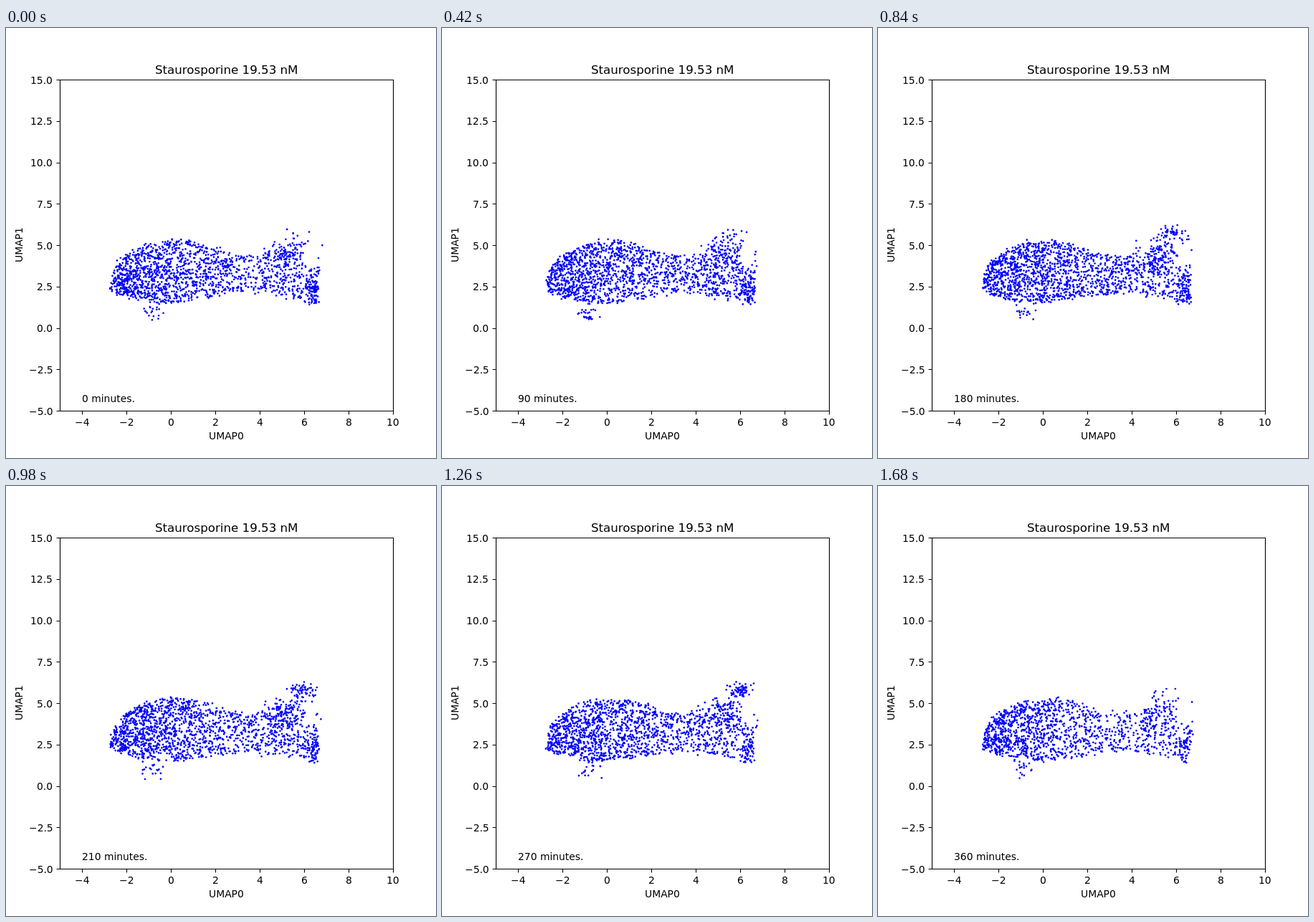
An HTML page with a canvas for the animation above (1.82 s loop, 600 by 600 pixels).

```html
<!DOCTYPE html>
<html lang="en">
<head>
<meta charset="utf-8">
<title>Scatter over time</title>
<style>
html, body { margin: 0; width: 100%; height: 100%; overflow: hidden; background: #fff; }
svg, canvas { position: absolute; left: 0; top: 0; width: 600px; height: 600px; }
text { font: 13.89px "DejaVu Sans", sans-serif; fill: #000; }
.title { font-size: 16.67px; }
path { fill: none; stroke: #000; stroke-width: 1.11; }
</style>
</head>
<body>
<svg id="plot" viewBox="0 0 600 600"><path id="axes"/></svg>
<canvas id="dots" width="600" height="600"></canvas>
<script>
const STEP = 140, COUNT = 13, RADIUS = 1.35;
const { PI, sin, cos, exp, sqrt, round } = Math;
const plot = document.getElementById("plot");

// Places text so that its start falls on a whole pixel; align 0, 0.5 or 1
function addText(value, x, y, align, cls = "") {
  const t = document.createElementNS("http://www.w3.org/2000/svg", "text");
  t.setAttribute("class", cls);
  t.textContent = value.replace("-", "\u2212");
  plot.append(t);
  t.setAttribute("x", round(x - align * t.getComputedTextLength()));
  t.setAttribute("y", y);
  return t;
}

function drawAxes() {
  let d = "M75.5 72.5H540.5V534.5H75.5Z";
  for (let v = -4; v <= 10; v += 2) {
    const x = 75 + (v + 5) * 31;
    d += `M${x + 0.5} 534.5v5`;
    addText(String(v), x, 555, 0.5);
  }
  for (let v = -5; v <= 15; v += 2.5) {
    const y = 534 - (v + 5) * 23.1;
    d += `M75.5 ${round(y) + 0.5}h-5`;
    addText(v.toFixed(1), 65.28, Math.ceil(y + 5.2), 1);
  }
  document.getElementById("axes").setAttribute("d", d);
  addText("Staurosporine 19.53 nM", 307.5, 64, 0.5, "title");
  addText("UMAP0", 307.5, 574, 0.5);
  addText("UMAP1", 0, 0, 0.5).setAttribute("transform", "translate(23 303) rotate(-90)");
}

function random(seed) {
  return () => {
    seed = (seed + 0x6D2B79F5) | 0;
    let t = Math.imul(seed ^ (seed >>> 15), 1 | seed);
    t = (t + Math.imul(t ^ (t >>> 7), 61 | t)) ^ t;
    return ((t ^ (t >>> 14)) >>> 0) / 4294967296;
  };
}

// Rounded nose, then a wave that dips at the neck and rises again
function topEdge(x) {
  if (x < 240) return 356 - 60 * sqrt(1 - ((240 - x) / 94) ** 2);
  const y = 307 - 11 * cos(2 * PI * (x - 240) / 190);
  return x < 416 ? y : 333;
}

function bottomEdge(x) {
  if (x < 225) return 384 - 17 * ((225 - x) / 79) ** 2;
  return 377.5 + 6.5 * cos(2 * PI * (x - 225) / 225);
}

function cloud(step) {
  const rnd = random(step * 977 + 41);
  const gauss = () => sqrt(-2 * Math.log(1 - rnd())) * cos(2 * PI * rnd());
  const t = step / (COUNT - 1);
  const swell = sin(PI * t);
  const late = sin(PI * t * t);
  const path = new Path2D();

  function dot(x, y) {
    path.moveTo(x + RADIUS, y);
    path.arc(x, y, RADIUS, 0, 2 * PI);
  }

  function blob(n, cx, cy, sx, sy, [x0, y0, x1, y1]) {
    for (let k = 0; k < round(n);) {
      const x = cx + gauss() * sx, y = cy + gauss() * sy;
      if (x < x0 || x > x1 || y < y0 || y > y1) continue;
      dot(x, y);
      k++;
    }
  }

  // Body: dense at the nose, thinning out to the right
  const right = 0.053 - 0.012 * t + 0.012 * swell;
  for (let k = 0; k < 4900; k++) {
    const x = 146 + rnd() * 291, y = 292 + rnd() * 94;
    const density = right + 0.12 * exp((146 - x) / 65);
    if (y < topEdge(x) || y > bottomEdge(x) || rnd() * 0.18 > density) continue;
    dot(x + gauss(), y + gauss() * gauss() * 2);
  }

  blob(60 - 25 * t + 45 * swell, 391, 318, 15, 14, [350, 296, 418, 352]);
  blob(65 - 20 * t, 428, 367, 6, 12, [408, 332, 437, 386]);
  blob(10 + 58 * late, 404 + 12 * late, 290 - 5 * late, 15 - 6 * late, 6, [370, 273, 439, 306]);
  blob(18, 204, 396, 9, 7, [188, 384, 240, 409]);
  blob(4, 437, 325, 3, 16, [424, 288, 442, 352]);

  // Short streak under the body, brightest early on
  for (let k = round(24 * exp(-((step - 2) ** 2))); k > 0; k--) {
    const u = rnd();
    dot(197 + u * 17, 402.5 + u * 4.5 + gauss());
  }
  return path;
}

drawAxes();
const clock = addText("0 minutes.", 106, 522, 0);
const clouds = Array.from({ length: COUNT }, (_, i) => cloud(i));
const ctx = document.getElementById("dots").getContext("2d");
ctx.fillStyle = "#00f";
let shown = -1;

function show(step) {
  if (step === shown) return;
  shown = step;
  ctx.clearRect(0, 0, 600, 600);
  ctx.fill(clouds[step]);
  clock.textContent = `${step * 30} minutes.`;
}

const start = performance.now();
function tick() {
  show(Math.floor((performance.now() - start) / STEP) % COUNT);
  requestAnimationFrame(tick);
}
tick();
</script>
</body>
</html>
```
